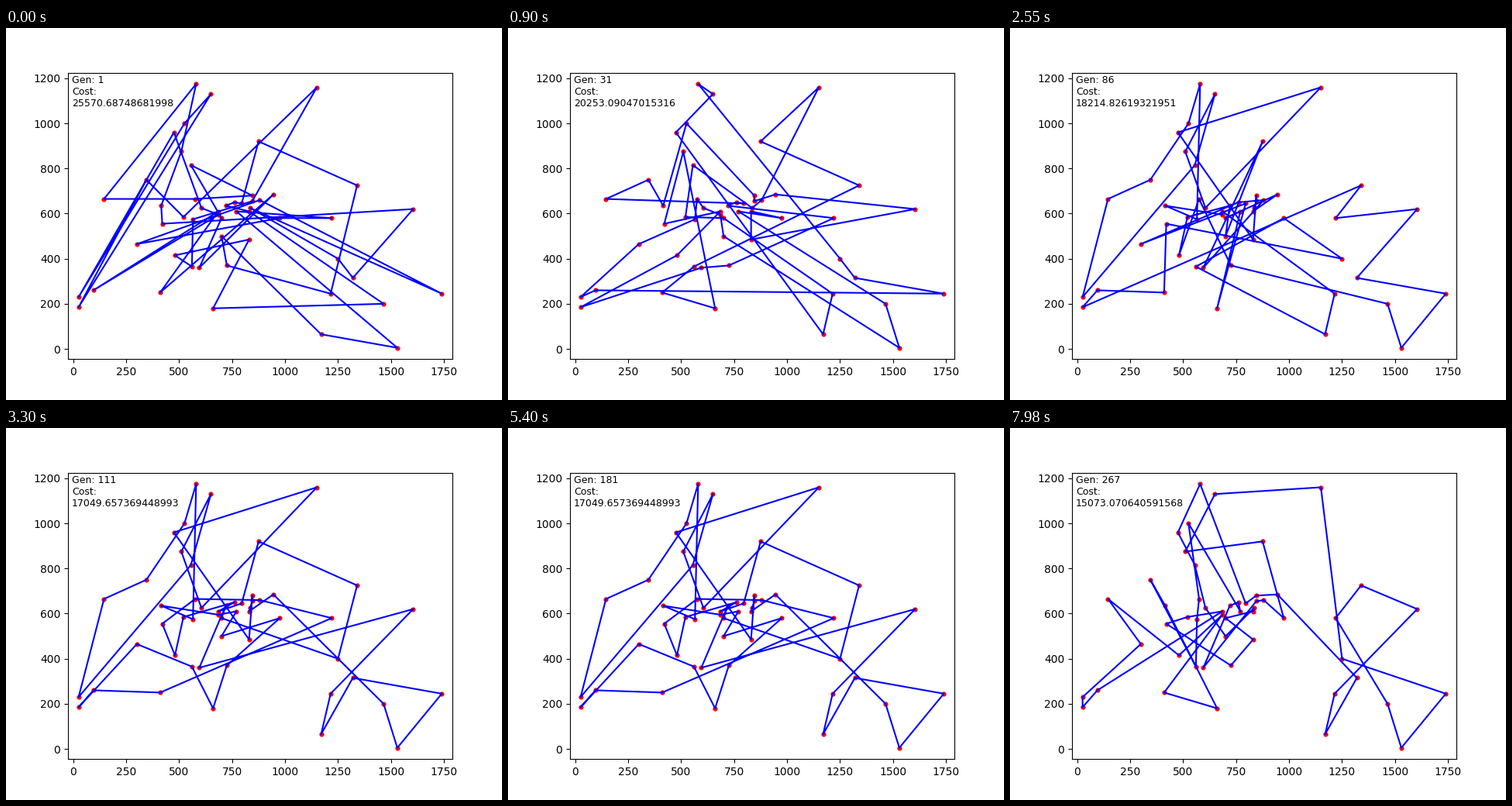
Recreate the animation shown at these times as a matplotlib script. Size 640 by 480 pixels, loop 8000 ms.

```python
import matplotlib.pyplot as plt
import numpy as np
from matplotlib.animation import FuncAnimation

LOOP_MS = 8000
GENERATIONS = 267
JUMPS = 10  # visible improvements on the way to each milestone

CITIES = np.array([
    (565, 575), (25, 185), (345, 750), (945, 685), (845, 655), (880, 660),
    (25, 230), (525, 1000), (580, 1175), (650, 1130), (1605, 620),
    (1220, 580), (1465, 200), (1530, 5), (845, 680), (725, 370), (145, 665),
    (415, 635), (510, 875), (560, 365), (300, 465), (520, 585), (480, 415),
    (835, 625), (975, 580), (1215, 245), (1320, 315), (1250, 400),
    (660, 180), (410, 250), (420, 555), (575, 665), (1150, 1160),
    (700, 580), (685, 595), (685, 610), (770, 610), (795, 645), (720, 635),
    (760, 650), (475, 960), (95, 260), (875, 920), (700, 500), (555, 815),
    (830, 485), (1170, 65), (830, 610), (605, 625), (595, 360), (1340, 725),
    (1740, 245)])

# Tours list the cities by number, counted from 1.
start = [22, 3, 2, 10, 8, 7, 41, 49, 35, 42, 36, 30, 4, 50, 34, 45, 15, 32,
         17, 9, 19, 18, 31, 11, 27, 28, 24, 52, 6, 21, 25, 12, 37, 14, 47,
         44, 16, 26, 51, 43, 38, 40, 39, 48, 13, 29, 46, 23, 20, 1, 5, 33]
early = [24, 45, 22, 34, 26, 47, 41, 10, 9, 28, 27, 52, 42, 7, 21, 1, 32, 49,
         35, 44, 14, 13, 37, 25, 48, 46, 11, 4, 5, 15, 8, 18, 3, 17, 38, 40,
         39, 12, 16, 50, 2, 23, 36, 31, 19, 29, 30, 20, 51, 43, 33, 6]
second = [34, 41, 10, 9, 28, 31, 30, 42, 2, 51, 12, 11, 27, 52, 14, 13, 33,
          37, 29, 38, 21, 7, 17, 3, 18, 45, 8, 4, 6, 50, 43, 44, 5, 19, 1,
          40, 15, 20, 25, 46, 48, 24, 39, 22, 23, 32, 16, 49, 47, 26, 36, 35]
plateau = [35, 18, 1, 9, 8, 3, 17, 7, 45, 10, 19, 49, 33, 41, 46, 15, 5, 24,
           48, 4, 13, 14, 52, 27, 47, 26, 11, 50, 39, 34, 28, 51, 43, 38, 36,
           40, 22, 23, 31, 32, 6, 12, 30, 42, 2, 21, 20, 29, 16, 25, 44, 37]
late = [39, 33, 8, 45, 3, 50, 30, 42, 2, 21, 20, 29, 16, 25, 44, 37, 31, 49,
        40, 9, 36, 17, 7, 18, 35, 34, 10, 19, 32, 24, 48, 4, 12, 13, 14, 52,
        27, 47, 26, 11, 51, 28, 46, 15, 5, 6, 23, 22, 38, 43, 41, 1]
final = [37, 8, 32, 1, 20, 3, 18, 29, 30, 35, 23, 17, 21, 7, 2, 42, 36, 22,
         31, 16, 46, 34, 48, 24, 44, 49, 45, 41, 9, 38, 15, 4, 27, 47, 26,
         11, 51, 12, 13, 14, 52, 28, 33, 10, 19, 43, 25, 6, 5, 50, 39, 40]

START_COST = 25570.68748681998
# first generation that improves, generation that settles, cost, tour
MILESTONES = [
    (2, 28, 20253.09047015316, early),
    (56, 68, 19313.218513359257, second),
    (73, 109, 17049.657369448993, plateau),
    (192, 211, 16318.072610668083, late),
    (219, 262, 15073.070640591568, final),
]


def reversals(a, b):
    """Tours met while turning a into b by reversing stretches."""
    k = a.index(b[0])
    cur = a[k:] + a[:k]
    steps = [cur]
    for i, city in enumerate(b):
        j = cur.index(city)
        if j != i:
            cur = cur[:i] + cur[i:j + 1][::-1] + cur[j + 1:]
            steps.append(cur)
    return steps


def build_history():
    """Map each generation with an improvement to its (cost, tour)."""
    history = {1: (START_COST, start)}
    cost, tour = START_COST, start
    for first, last, goal_cost, goal in MILESTONES:
        steps = reversals(tour, goal)
        for p in np.linspace(1 / JUMPS, 1, JUMPS):
            gen = first + round((last - first) * (p - 1 / JUMPS) / (1 - 1 / JUMPS))
            now = goal_cost + (cost - goal_cost) * (1 - p) ** 1.3
            history[gen] = (float(now), steps[round(p * (len(steps) - 1))])
        cost, tour = goal_cost, goal
    return history


HISTORY = build_history()

fig, ax = plt.subplots(figsize=(6.4, 4.8), dpi=100)
ax.set_xlim(CITIES[:, 0].min() - 50, CITIES[:, 0].max() + 50)
ax.set_ylim(CITIES[:, 1].min() - 50, CITIES[:, 1].max() + 50)
ax.set_xticks(range(0, 1751, 250))
ax.set_yticks(range(0, 1201, 200))
ax.scatter(CITIES[:, 0], CITIES[:, 1], s=12, color="red", zorder=1)
route, = ax.plot([], [], color="blue", lw=1.5, zorder=2)
label = ax.text(0.01, 0.99, "", transform=ax.transAxes, fontsize=9, va="top")


def update(i):
    gen = i + 1
    cost, tour = HISTORY[max(g for g in HISTORY if g <= gen)]
    loop = np.array(tour + tour[:1]) - 1
    route.set_data(CITIES[loop, 0], CITIES[loop, 1])
    label.set_text(f"Gen: {gen}\nCost:\n{cost}")
    return route, label


anim = FuncAnimation(fig, update, frames=GENERATIONS,
                     interval=LOOP_MS / GENERATIONS, repeat=True,
                     repeat_delay=0, blit=False)
plt.show()
```
